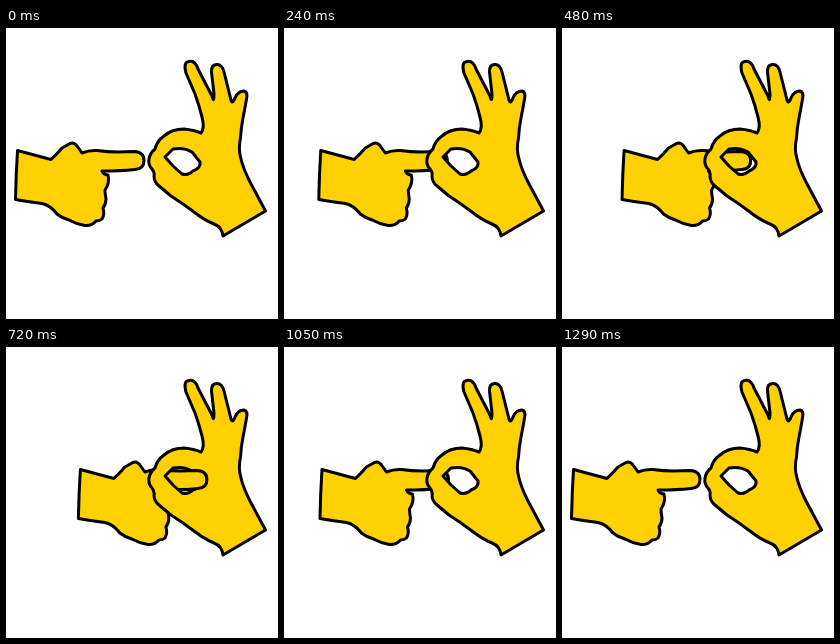
An HTML page that plays this animation: 272x291 px, repeating every 1320 ms.

```html
<!DOCTYPE html>
<html>
<head>
<meta charset="utf-8">
<style>
html, body { margin: 0; height: 100%; overflow: hidden; background: #fff; }
svg { display: block; }
path { fill: #ffd103; stroke: #000; stroke-width: 3; stroke-linejoin: round; }
</style>
</head>
<body>
<svg width="272" height="291" viewBox="0 0 272 291">
  <defs>
    <path id="pointing" d="M11.500 122.500L45 131.500Q50 127 56 120L64 115.500Q68 114 71 118L76 125Q83 122 91 122.500Q101 124 112 124L128 123.500Q138 124 138 132.500Q138 141 129 141.500Q115 143 96 143Q98 147 102 147Q104 155 99 162Q99 166 100 171Q100 176 97 180Q99 186 96 191Q94 193 90 193Q86 198 79 197.500Q70 196 63 192Q56 190 51 186Q44 177 36 175.500Q23 174 9.500 171.500Q10 146 11.500 122.500Z"/>
    <!-- Where the fingertip passes in front of the ring -->
    <clipPath id="front"><rect x="180" y="110" width="50" height="50"/></clipPath>
  </defs>
  <use class="mover" href="#pointing"/>
  <path fill-rule="evenodd" d="M143 131Q144 125 149 121Q151 113 158 108Q166 101 178 101Q188 102 195 105Q199 100 196 89Q193 77 189 66L180 45Q177 34 183 33.500Q189 32 192 41L206 68Q208 76 208 66L205.500 44Q205 37 210.500 36.500Q216 36 218 44L224.500 70Q226 78 229 70Q232 63 238 63Q242 64 240.500 71Q239 80 237 90Q235 100 234.500 110Q232 121 235 131Q237 140 244 154L259.500 183L217 208Q216 199 208 196Q198 192 188 184Q176 175 165 168L153 158Q148 154 148 148Q149 145 146 141Q142 137 143 131Z
    M159 129L167 121Q178 119 186 124L194 134Q195 140 187 143Q182 148 176 146L167 138Z"/>
  <g clip-path="url(#front)"><use class="mover" href="#pointing"/></g>
</svg>
<script>
const STEP = 30, STEPS = 44, TURN = 22, REACH = 69.5;
const movers = document.querySelectorAll('.mover');

function draw() {
  const step = Math.floor(performance.now() / STEP) % STEPS;
  const x = REACH * Math.min(step / TURN, (STEPS - 1 - step) / (STEPS - 1 - TURN));
  movers.forEach(m => m.setAttribute('transform', `translate(${x} 0)`));
  requestAnimationFrame(draw);
}
draw();
</script>
</body>
</html>
```
